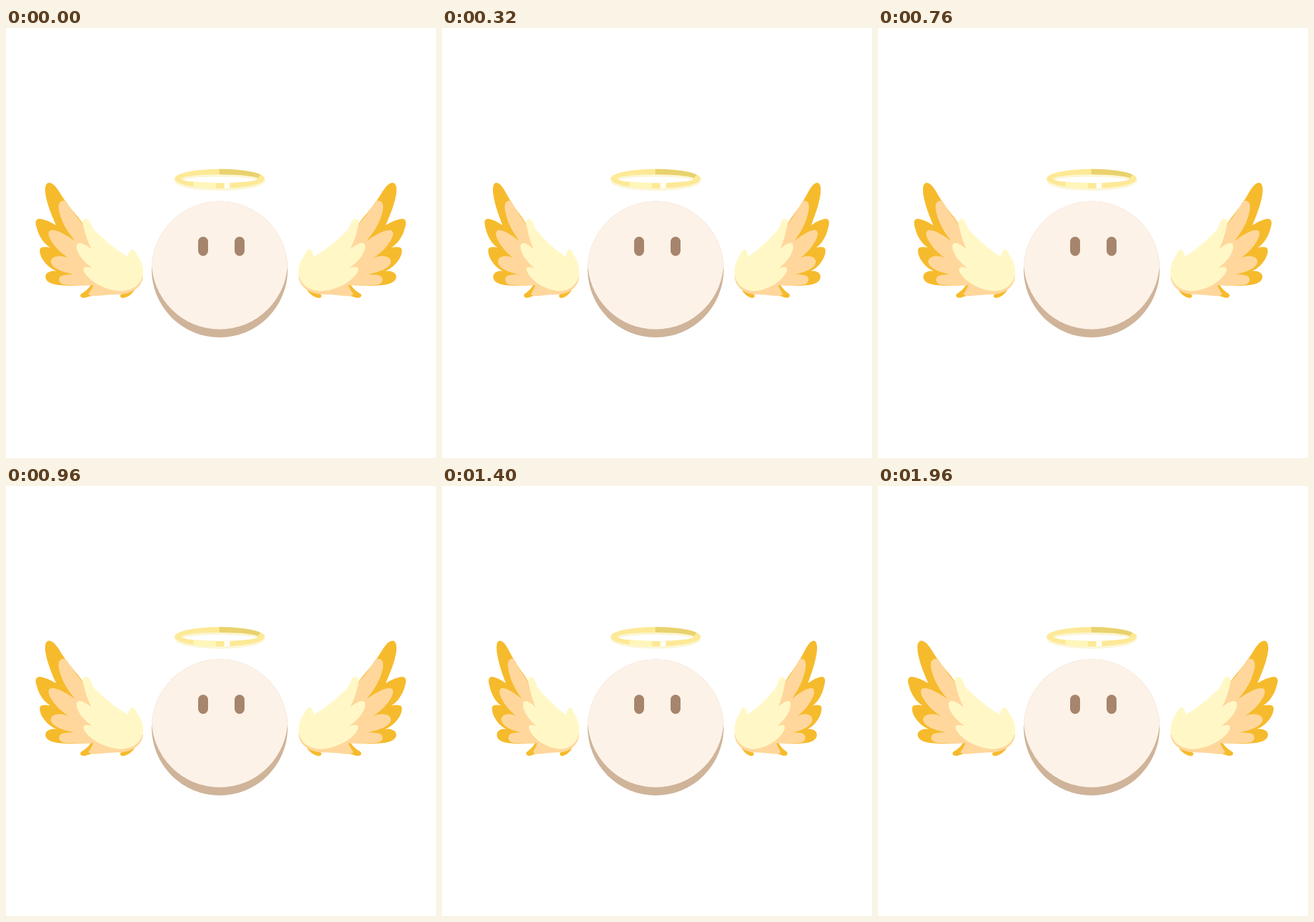
Recreate the animation shown at these times as an HTML page. Size 649x649 px, loop 2 s.

```html
<!DOCTYPE html>
<html lang="en">
<head>
<meta charset="utf-8">
<title>Winged face</title>
<style>
html, body { margin: 0; width: 100%; height: 100%; overflow: hidden; background: #fff; }
svg { display: block; width: 100%; height: 100%; }
</style>
</head>
<body>
<svg viewBox="0 0 649 649">
  <defs>
    <g id="wing">
      <path fill="#f6bb2c" d="M65 233.5C59 234 58 243 60 253C62 265 68 281 75.5 297.5C69 294 60 289 51 288C43.5 288 44 295 46.5 302C49 313 57 326 67 331.5C62 330 57 330 53 331.5C49.5 334 51 341 54 347C59 356 67 363 76 367C71 366 64 367 61 371C57.5 376 60 383 70 386C84 390 105 389 128 388C124 394 119 398 113 401.5C110.5 405 114 408 120 407C127 405 140 400 180 396L172 404C173 408.5 178 408 182 406C187 404 191 400 194 396L160 340L118 298C108 283 98 274 90 262C81 250 75 234 65 233.5Z"/>
      <path fill="#ffd79c" d="M85 261C79 262 78 270 81 280C85 295 93 308 104 321C94 315 82 306 70 305C63 305 63 312 67 319C73 330 82 339 94 347C87 344 79 343 72 346C65 350 67 357 74 362C82 367 93 370 103 372C97 372 90 372 84 374C78 377 79 384 86 387C98 389 115 389 132 388C130 392 128 397 124.5 401C125 404 129 405 136 404.5C150 403 162 402 172 402C188 401 205 393 207 375L160 340L119 300C112 291 101 279 93 265C91 261 88 260.5 85 261Z"/>
      <path fill="#fff8c6" d="M121 288C115 288 115 295 118 303C120 313 124 324 129 334C122 328 116 325 111 324.5C105 325 105 332 110 341C114 349 121 355 131 363C126 361 121 360 118 361.5C115 364 118 371 127 379C137 388 155 396 172 397C190 397 204 388 207 371C208 357 201 347 198 343C194 333 189 332 187 337C185 340 184 342 184 345C165 335 148 319 133 305C128 297 127 288 121 288Z"/>
    </g>
    <path id="ring" fill-rule="evenodd" d="M254.5 227.5a68 14.7 0 0 1 136 0a68 14.7 0 0 1-136 0ZM265 227.5a57.5 6.5 0 0 0 115 0a57.5 6.5 0 0 0-115 0Z"/>
    <clipPath id="disc"><circle cx="322.5" cy="364.3" r="102.7"/></clipPath>
    <clipPath id="shade"><path d="M322 205H390L386 219L379 228H322Z"/></clipPath>
    <clipPath id="shine"><path d="M283 230H317V245H283Z"/></clipPath>
    <clipPath id="glint"><path d="M329.5 230H338V245H329.5Z"/></clipPath>
  </defs>

  <use class="wing" href="#wing"/>
  <use class="wing" href="#wing"/>

  <g clip-path="url(#disc)">
    <circle cx="322.5" cy="364.5" r="104" fill="#cfb49a"/>
    <circle cx="322.5" cy="352" r="102.7" fill="#fdf2e8"/>
  </g>
  <g fill="#a6856c">
    <rect x="290" y="315" width="15" height="29" rx="7.5"/>
    <rect x="345" y="315" width="15" height="29" rx="7.5"/>
  </g>

  <use href="#ring" y="3.5" fill="#fbf6d6"/>
  <use href="#ring" fill="#fde996"/>
  <use href="#ring" fill="#e9d26e" clip-path="url(#shade)"/>
  <use href="#ring" fill="#fff6b9" clip-path="url(#shine)"/>
  <use href="#ring" fill="#fffef2" clip-path="url(#glint)"/>
</svg>
<script>
const LOOP = 2000, STEP = 40, FLAP = 960, ROOT = 207.3, STAGE = 648.5;
const [left, right] = document.querySelectorAll('.wing');

// Each wing narrows towards its root beside the body.
function draw(now) {
  const t = Math.floor(now % LOOP / STEP) * STEP;
  const s = 0.92 + 0.08 * Math.cos(2 * Math.PI * t / FLAP);
  const shift = ROOT * (1 - s);
  left.setAttribute('transform', `matrix(${s} 0 0 1 ${shift} 0)`);
  right.setAttribute('transform', `matrix(${-s} 0 0 1 ${STAGE - shift} 0)`);
}

const start = performance.now();
function tick() {
  draw(performance.now() - start);
  requestAnimationFrame(tick);
}
tick();
</script>
</body>
</html>
```
